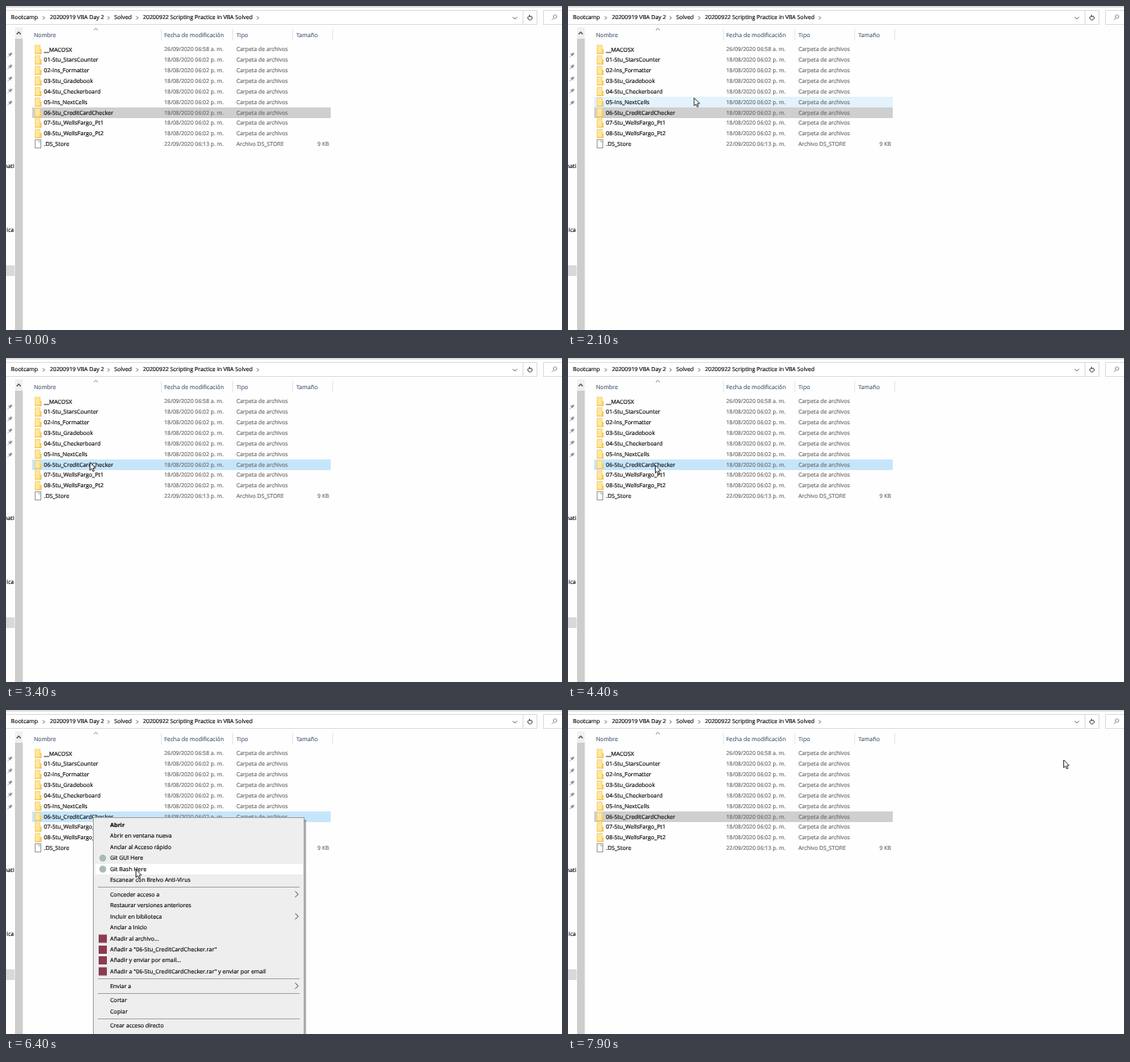
Write an HTML page with a canvas that moves like this. It is 678x396 px and loops after 8 s.

```html
<!DOCTYPE html>
<html lang="es">
<head>
<meta charset="utf-8">
<title>Explorador</title>
<style>
html, body { margin: 0; width: 100%; height: 100%; overflow: hidden; background: #fefefe; }
canvas { display: block; }
</style>
</head>
<body>
<canvas id="stage" width="678" height="396"></canvas>
<script>
const c = document.getElementById('stage').getContext('2d');
const LOOP = 8000, STEP = 100;
const ROW_TOP = 53, ROW_H = 12.85, SELECTED = 6;
const CLICK = 3800, MENU_OPEN = 5000, MENU_CLOSE = 6800, BLUR = 7300;

const names = ['__MACOSX', '01-Stu_StarsCounter', '02-Ins_Formatter', '03-Stu_Gradebook',
  '04-Stu_Checkerboard', '05-Ins_NextCells', '06-Stu_CreditCardChecker',
  '07-Stu_WellsFargo_Pt1', '08-Stu_WellsFargo_Pt2', '.DS_Store'];

// [label, centre y, decoration]
const menu = [
  ['Abrir', 140.5, 'bold'], ['Abrir en ventana nueva', 154], ['Anclar al Acceso rápido', 167.5],
  ['Git GUI Here', 181, 'dot'], ['Git Bash Here', 194.5, 'dot'],
  ['Escanear con Brelvo Anti-Virus', 208],
  ['Conceder acceso a', 225.5, 'sub'], ['Restaurar versiones anteriores', 239],
  ['Incluir en biblioteca', 252.5, 'sub'], ['Anclar a Inicio', 266],
  ['Añadir al archivo...', 279.5, 'square'],
  ['Añadir a "06-Stu_CreditCardChecker.rar"', 293, 'square'],
  ['Añadir y enviar por email...', 306, 'square'],
  ['Añadir a "06-Stu_CreditCardChecker.rar" y enviar por email', 319.5, 'square'],
  ['Enviar a', 337.5, 'sub'], ['Cortar', 355], ['Copiar', 368.5], ['Crear acceso directo', 386]
];

// Pointer path: [time, x, y]
const path = [
  [700, -12, 160], [1500, 169, 111], [1900, 169, 111], [2600, 90, 118],
  [3000, 90, 118], [3600, 106, 131], [5500, 106, 131], [6300, 158, 195],
  [7300, 158, 195], [7800, 604, 61]
];

function pointer(t) {
  let a = path[0];
  for (const b of path) {
    if (t < b[0]) {
      if (a === b) break;
      const u = (t - a[0]) / (b[0] - a[0]), k = u * u * (3 - 2 * u);
      return [a[1] + (b[1] - a[1]) * k, a[2] + (b[2] - a[2]) * k];
    }
    a = b;
  }
  return [a[1], a[2]];
}

function box(x, y, w, h, fill, edge) {
  if (fill) { c.fillStyle = fill; c.fillRect(x, y, w, h); }
  if (edge) { c.strokeStyle = edge; c.lineWidth = 1; c.strokeRect(x + .5, y + .5, w - 1, h - 1); }
}

// A hairline outline gives small text a firmer stroke
function text(s, x, y, size, color, align = 'left', weight = 400) {
  c.font = `${weight} ${size}px "Open Sans", "Noto Sans", sans-serif`;
  c.textAlign = align;
  c.fillStyle = c.strokeStyle = color;
  c.lineWidth = .18;
  c.fillText(s, x, y + size * .36);
  c.strokeText(s, x, y + size * .36);
}

function line(color, width, ...p) {
  c.beginPath();
  for (let i = 0; i < p.length; i += 2) c.lineTo(p[i], p[i + 1]);
  c.strokeStyle = color;
  c.lineWidth = width;
  c.stroke();
}

const right = (x, y, r, color) => line(color, .9, x - r / 2, y - r, x + r / 2, y, x - r / 2, y + r);

function ring(x, y, r, from, to, color) {
  c.beginPath();
  c.arc(x, y, r, from, to);
  c.strokeStyle = color;
  c.lineWidth = 1;
  c.stroke();
}

function addressBar(active) {
  box(0, 0, 678, 2, '#dedede');
  box(-2, 5, 633, 18, '#fff', '#dcdcdc');
  box(630, 5, 18, 18, '#fff', '#dcdcdc');
  box(655, 5, 30, 18, '#fff', '#dcdcdc');
  text('Bootcamp', 6, 14, 6.9, '#111');
  text('20200919 VBA Day 2', 53.5, 14, 6.9, '#111');
  text('Solved', 132, 14, 6.9, '#111');
  text('20200922 Scripting Practice in VBA Solved', 167, 14, 6.9, '#111');
  for (const x of [46, 125, 160]) right(x, 14.5, 2, '#444');
  if (!active) right(307, 14.5, 2, '#444');
  line('#555', 1, 618, 13.5, 620.5, 16, 623, 13.5);
  ring(639, 14.5, 2.6, -.6, 4.6, '#444');
  line('#444', 1, 638.5, 10.7, 638.5, 13.2, 641, 12.5);
  ring(669.5, 13, 2.2, 0, 7, '#999');
  line('#999', 1, 668, 14.7, 665.5, 17.2);
}

function sidebar() {
  box(11, 26, 9.5, 14, '#f0f0f0');
  box(11, 40, 9.5, 356, '#cdcdcd');
  line('#555', 1.3, 13, 34.5, 15.5, 32, 18, 34.5);
  for (let i = 0; i < 5; i++) {
    const y = 59.5 + i * 14.7;
    line('#8a8f96', 2.4, 4.2, y + .8, 7, y - 2);
    line('#8a8f96', 1, 3.2, y - 1.4, 6.2, y + 1.8);
    line('#8a8f96', .8, 4.6, y + .3, 2, y + 3);
  }
  text('nati', 10, 196, 6.9, '#111', 'right');
  text('ica', 9.5, 274, 6.9, '#111', 'right');
  box(0, 317, 10.5, 13, '#d9d9d9');
}

function header() {
  const color = '#56677f';
  text('Nombre', 34, 35, 7, color);
  text('Fecha de modificación', 193, 35, 7, color);
  text('Tipo', 281, 35, 7, color);
  text('Tamaño', 354, 35, 7, color);
  for (const x of [189, 276, 349, 398]) box(x, 28, 1, 14, '#e7e7e7');
  line('#777', .9, 107, 29.5, 109.5, 27.3, 112, 29.5);
}

function icon(y, folder) {
  if (folder) {
    box(35, y - 5.5, 7, 11, '#f6d67a');
    box(36, y - 4.5, 5, 9, '#ffe79b');
    box(41, y - .5, 2.5, 6, '#f3cf6c');
    box(35, y + 4.7, 8.5, .8, '#e6bf5c');
  } else {
    box(35, Math.round(y - 5.5), 8, 11, '#fff', '#a0a0a0');
    line('#a0a0a0', .8, 40, y - 5, 40, y - 2.5, 43, y - 2.5);
  }
}

function rows(active, hover) {
  names.forEach((name, i) => {
    const y = ROW_TOP + i * ROW_H, top = Math.round(y - 6.2);
    const folder = i < 9;
    if (i === SELECTED) box(32, top, 364, 13, active || hover === i ? '#c6e5fb' : '#cfcfcf');
    else if (hover === i) box(32, top, 364, 13, '#e3f2fb');
    icon(y, folder);
    text(name, 46.3, y, 6.95, '#111');
    const date = i === 0 ? '26/09/2020 06:58 a. m.' : folder ? '18/08/2020 06:02 p. m.' : '22/09/2020 06:13 p. m.';
    text(date, 193, y, 6.75, '#707070');
    text(folder ? 'Carpeta de archivos' : 'Archivo DS_STORE', 281, y, 6.8, '#707070');
    if (!folder) text('9 KB', 394, y, 6.8, '#707070', 'right');
  });
}

function contextMenu(px, py) {
  box(109, 134, 257, 270, 'rgba(0,0,0,.3)');
  box(106, 131, 258, 270, '#eeeeee', '#a2a2a2');
  for (const [label, y, kind] of menu) {
    if (px > 108 && px < 362 && Math.abs(py - y) < 6.75) box(109, y - 6.5, 253, 13, '#fff');
    text(label, 127, y, 6.93, '#111', 'left', kind === 'bold' ? 700 : 400);
    if (kind === 'sub') right(354.5, y - .3, 3.6, '#333');
    if (kind === 'square') box(113, y - 5, 10, 10, '#8c3b50');
    if (kind === 'dot') {
      c.beginPath();
      c.arc(118, y, 4.2, 0, 7);
      c.fillStyle = '#a9b9b4';
      c.fill();
    }
  }
  for (const y of [216, 328, 346, 377]) box(112, y, 246, 1, '#a6a6a6');
}

function arrow(x, y) {
  c.save();
  c.translate(x + .5, y);
  c.beginPath();
  for (const [dx, dy] of [[0, 0], [0, 9.6], [2.2, 7.6], [3.7, 11], [5.2, 10.3], [3.8, 7], [6.7, 6.8]]) c.lineTo(dx, dy);
  c.closePath();
  c.fillStyle = '#fff';
  c.fill();
  c.strokeStyle = '#222';
  c.lineWidth = .9;
  c.stroke();
  c.restore();
}

function draw(t) {
  const [x, y] = pointer(t);
  const active = t >= CLICK && t < BLUR;
  const open = t >= MENU_OPEN && t < MENU_CLOSE;
  const overList = !open && x >= 32 && x < 396;
  const hover = overList ? Math.round((y - ROW_TOP) / ROW_H) : -1;
  box(0, 0, 678, 396, '#fefefe');
  addressBar(active);
  sidebar();
  header();
  rows(active, hover);
  if (open) contextMenu(x, y);
  arrow(x, y);
}

c.textRendering = 'geometricPrecision';
const start = performance.now();
function frame() {
  const t = (performance.now() - start) % LOOP;
  draw(Math.floor(t / STEP) * STEP);
  requestAnimationFrame(frame);
}
frame();
</script>
</body>
</html>
```
